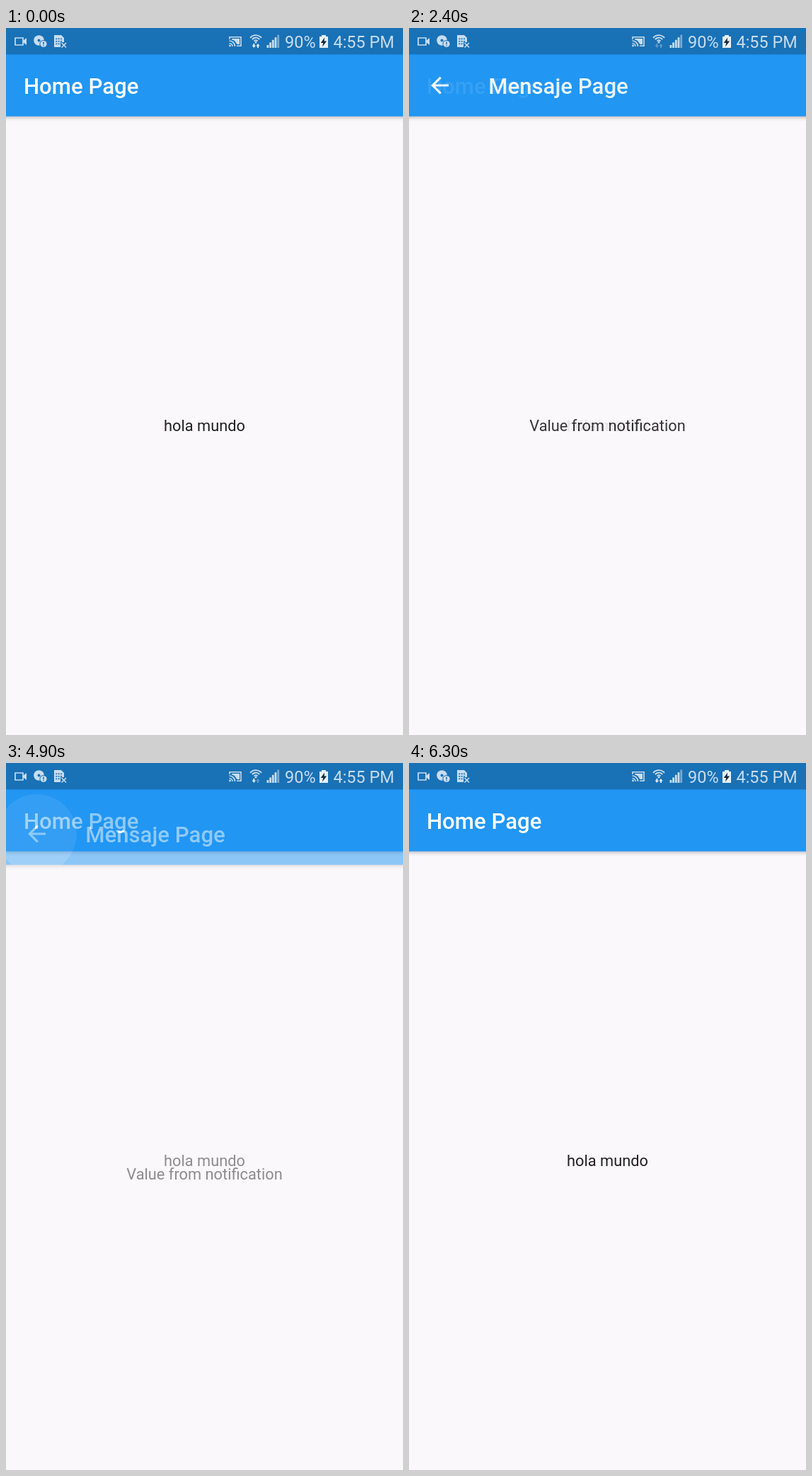
An HTML page with a canvas that plays this animation: 561 by 998 pixels, repeating every 6800 ms.

```html
<!DOCTYPE html>
<html lang="es">
<head>
<meta charset="utf-8">
<title>Home Page</title>
<style>
  html, body { margin: 0; width: 100%; height: 100%; overflow: hidden; background: #faf8fb; }
  canvas { display: block; }
</style>
</head>
<body>
<canvas id="stage" width="561" height="998"></canvas>
<script>
const W = 561, H = 998, LOOP = 6800, STEP = 100;
const DP = W / 360;
const STATUS = 24 * DP, BAR = 80 * DP;
const BAR_MID = (STATUS + BAR) / 2;
const OPEN = 2300, CLOSE = 4800;
const BLUE = '#2196f3', DARK = '#1971b6', BG = '#faf8fb', ICON = '#c9ddee';
const FONT = 'Roboto, Arial, sans-serif';
const TAU = Math.PI * 2;

const ctx = document.getElementById('stage').getContext('2d');
const layer = document.createElement('canvas');
layer.width = W;
layer.height = H;
const layerCtx = layer.getContext('2d');

function text(c, str, x, y, size, color, weight = 400, align = 'left') {
  c.font = `${weight} ${size}px ${FONT}`;
  c.textAlign = align;
  c.fillStyle = color;
  c.fillText(str, x, y);
}

function shape(c, color, path) {
  c.fillStyle = color;
  c.fill(new Path2D(path));
}

function line(c, width, path) {
  c.strokeStyle = ICON;
  c.lineWidth = width;
  c.stroke(new Path2D(path));
}

function disc(c, x, y, r, color) {
  c.fillStyle = color;
  c.beginPath();
  c.arc(x, y, r, 0, TAU);
  c.fill();
}

function arc(c, x, y, r, from, to) {
  c.beginPath();
  c.arc(x, y, r, from * TAU, to * TAU);
  c.stroke();
}

function box(c, color, x, y, w, h) {
  c.fillStyle = color;
  c.fillRect(x, y, w, h);
}

function drawPage(c, title, titleX, body) {
  box(c, BG, 0, 0, W, H);
  c.save();
  c.shadowColor = 'rgba(0,0,0,0.36)';
  c.shadowBlur = 4 * DP;
  c.shadowOffsetY = DP;
  box(c, BLUE, -20, -20, W + 40, BAR + 20);
  c.restore();
  text(c, title, titleX, 93, 20 * DP, '#fff', 500);
  text(c, body, W / 2, 569, 14 * DP, 'rgba(0,0,0,0.87)', 400, 'center');
}

function drawMessage(ripple) {
  const c = layerCtx;
  drawPage(c, 'Mensaje Page', 72 * DP, 'Value from notification');
  c.save();
  c.beginPath();
  c.rect(0, 0, W, BAR);
  c.clip();
  disc(c, 28 * DP, BAR_MID, 36 * DP, `rgba(255,255,255,${ripple})`);
  c.translate(16 * DP, BAR_MID - 12 * DP);
  c.scale(DP, DP);
  shape(c, '#fff', 'M20 11H7.83l5.59-5.59L12 4l-8 8 8 8 1.41-1.41L7.83 13H20z');
  c.restore();
}

function leftIcons(c) {
  line(c, 1.7, 'M13 14h11v10h-11z');
  shape(c, ICON, 'M24 18l5-4v10l-5-4z');

  disc(c, 46.5, 17.5, 7.3, ICON);
  disc(c, 46.5, 17.5, 2, DARK);
  disc(c, 53, 22.5, 5.6, DARK);
  disc(c, 53, 22.5, 4.6, ICON);
  shape(c, DARK, 'M52.3 19.6h1.5v3.6h-1.5zM52.3 24.2h1.5v1.4h-1.5z');

  shape(c, ICON, 'M68 10h10l4 4v13h-14z');
  for (let i = 0; i < 9; i++)
    box(c, DARK, 70.3 + i % 3 * 3.4, 14.5 + Math.floor(i / 3) * 3.5, 2, 1.7);
  box(c, DARK, 77, 20, 8, 8);
  line(c, 1.6, 'M78.5 21l6.5 6.5M85 21l-6.5 6.5');
}

// Small vertical arrow; dir is 1 for down, -1 for up
function trafficArrow(c, x, dir, on) {
  c.save();
  c.translate(x, 25);
  c.scale(1, dir);
  shape(c, on ? '#e3eef7' : '#5f9ac9', 'M-1-3h2v2.5h1.7L0 3-2.7-.5H-1z');
  c.restore();
}

function rightIcons(c, up, down) {
  line(c, 1.6, 'M316 16v-3.2h16v12.4h-6');
  shape(c, ICON, 'M319 15h11v8h-3.5l-3.5-5-4-1.8z');
  for (const r of [4.5, 8]) arc(c, 315.5, 26, r, -0.25, 0);
  disc(c, 316.5, 25, 1.4, ICON);

  c.lineWidth = 1.8;
  for (let i = 0; i < 3; i++) arc(c, 353, 20.5, 3.2 + i * 3.6, -0.39, -0.11);
  disc(c, 353, 20, 1.5, ICON);
  trafficArrow(c, 350.3, 1, down);
  trafficArrow(c, 356, -1, up);

  for (let i = 0; i < 5; i++) {
    const h = 4 + i * 3.6;
    box(c, i < 4 ? ICON : '#78aad2', 368.5 + i * 3.7, 28 - h, 2.8, h);
  }

  text(c, '90%', 394, 28, 23.5, ICON);
  shape(c, '#e8f1f8', 'M443 12h3v-2h6v2h3v16h-12z');
  shape(c, '#11283c', 'M450.2 13.5L444.8 21h3.4l-1.2 5.5 6.2-7.9h-3.6z');
  text(c, '4:55 PM', 548.6, 28, 23.4, ICON, 400, 'right');
}

// The message page fades in in place, then drops away while its opacity halves each step.
function messagePose(t) {
  const n = (t - CLOSE) / STEP;
  if (n <= 0) return { alpha: Math.min(1, Math.max(0, 0.9 * (t - OPEN) / STEP)), drop: 0, ripple: 0 };
  if (n >= 3) return { alpha: 0, drop: 0, ripple: 0 };
  return { alpha: 0.5 ** n, drop: Math.round(19.4 * n * n), ripple: 0.28 - 0.12 * n };
}

function draw(t) {
  const { alpha, drop, ripple } = messagePose(t);
  drawPage(ctx, 'Home Page', 16 * DP, 'hola mundo');
  if (alpha) {
    drawMessage(ripple);
    ctx.globalAlpha = alpha;
    ctx.drawImage(layer, 0, drop);
    ctx.globalAlpha = 1;
  }
  box(ctx, DARK, 0, 0, W, STATUS);
  leftIcons(ctx);
  const slot = Math.floor(t / 700);
  rightIcons(ctx, slot % 9 === 0, slot % 5 !== 3);
}

const start = performance.now();
function tick() {
  const t = (performance.now() - start) % LOOP;
  draw(Math.floor(t / STEP) * STEP);
  requestAnimationFrame(tick);
}
tick();
</script>
</body>
</html>
```
